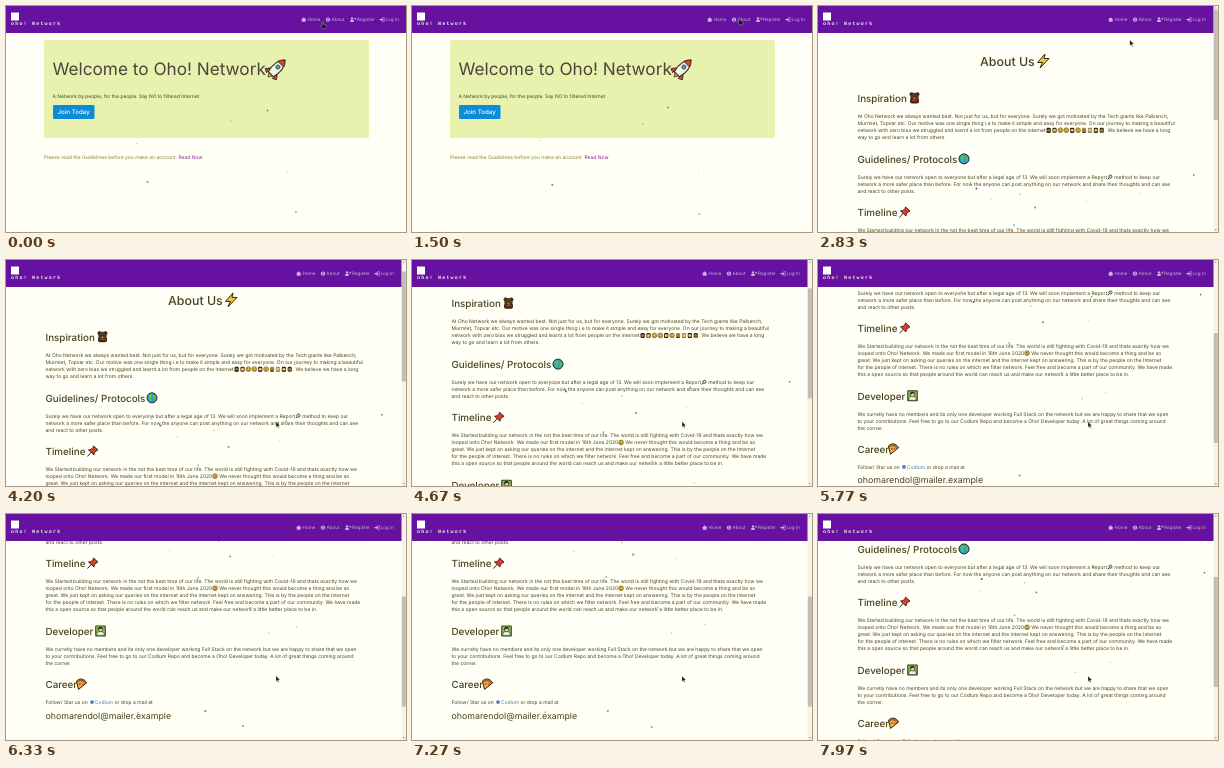
These frames come from a looping animation (400 px wide and 226 px high, 8 s). An HTML page with a canvas:

```html
<!DOCTYPE html>
<html lang="en">
<head>
<meta charset="utf-8">
<title>Oho! Network</title>
<style>
  html, body { margin: 0; width: 100%; height: 100%; overflow: hidden; background: #fffff6; }
  canvas { display: block; width: 100vw; height: 100vh; }
</style>
</head>
<body>
<canvas></canvas>
<script>
const LOOP = 8000, PAGE_SWITCH = 2080;
const INK = '#47441f', PURPLE = '#66119f', PAPER = '#fffff6', OUTLINE = '#2b251c';
const canvas = document.querySelector('canvas');
const ctx = canvas.getContext('2d');

// Key lists: [time, value, value, ...]
const SCROLL = [[3980, 0], [4200, 15], [5100, 79.5], [5770, 138], [5920, 157], [7530, 157], [7970, 118], [8000, 116]];
const POINTER = [[0, 316, 16], [700, 318, 12.5], [1200, 327, 12], [2480, 326, 12],
  [2780, 312, 33.5], [2950, 311.5, 35], [3700, 270, 161.5], [8000, 270, 162]];

// Drifting specks, placed in page coordinates
const HOME_SPECKS = [[225, 115], [256, 104], [146, 177], [283, 165], [284, 208], [134, 135]];
const ABOUT_SPECKS = [[149, 172], [381, 173], [219, 198], [167, 196], [197, 217], [268, 199], [278, 172],
  [160, 184], [240, 247], [260, 280], [287, 268], [207, 188], [200, 350], [138, 359], [236, 367], [316, 186]];

function at(keys, t) {
  let i = keys.findIndex(k => k[0] > t);
  if (i < 0) return keys.at(-1).slice(1);
  if (i === 0) return keys[0].slice(1);
  const [a, b] = [keys[i - 1], keys[i]];
  const p = (t - a[0]) / (b[0] - a[0]);
  return a.slice(1).map((v, n) => v + (b[n + 1] - v) * p);
}

// ---- drawing helpers ----
function rect(x, y, w, h, color, radius = 0) {
  ctx.fillStyle = color;
  ctx.beginPath();
  ctx.roundRect(x, y, w, h, radius);
  ctx.fill();
}

function dot(x, y, r, color, line) {
  ctx.beginPath();
  ctx.arc(x, y, r, 0, 7);
  ctx.fillStyle = color;
  ctx.fill();
  if (line) { ctx.lineWidth = line; ctx.strokeStyle = OUTLINE; ctx.stroke(); }
}

function shape(d, color, line, stroke = OUTLINE) {
  const path = new Path2D(d);
  if (color) { ctx.fillStyle = color; ctx.fill(path); }
  if (line) { ctx.lineWidth = line; ctx.strokeStyle = stroke; ctx.stroke(path); }
}

function placed(x, y, draw, angle = 0) {
  ctx.save();
  ctx.translate(x, y);
  ctx.rotate(angle);
  draw();
  ctx.restore();
}

function setFont(size, weight = 400, family = 'Inter, "Open Sans", sans-serif') {
  ctx.font = `${weight} ${size}px ${family}`;
}

// ---- icons, each centred on the origin ----
const icons = {
  rocket() {
    shape('M-4 3L-8 8L-4 10ZM4 3L8 8L4 10Z', '#d8432f', .8);
    shape('M-2.5 8L0 12L2.5 8Z', '#f3b32c', .7);
    shape('M0 -12C6 -6 5 3 3.5 8H-3.5C-5 3 -6 -6 0 -12Z', '#f4f4ea', 1);
    shape('M0 -12C2.5 -9.5 3.6 -7.8 4 -6H-4C-3.6 -7.8 -2.5 -9.5 0 -12Z', '#d8432f', .8);
    dot(0, -2, 2, '#3fb5c8', .8);
  },
  bolt() { shape('M2 -7L-5.5 1.5H-.5L-3 7L6 -2.5H1Z', '#f6c62d', 1); },
  bear() {
    dot(-3, -3.7, 1.6, '#4d3018', .8);
    dot(3, -3.7, 1.6, '#4d3018', .8);
    rect(-4.5, 0, 9, 5.5, '#3a2414', 2);
    dot(0, -1, 3.8, '#5f3c1e', .7);
    rect(-3, 2, 6, 1.3, '#b53a2a');
    dot(-1.4, -1.6, .5, '#17130f');
    dot(1.4, -1.6, .5, '#17130f');
    dot(0, .4, 1, '#a87f50');
  },
  globe() {
    dot(0, 0, 5, '#259fe0', 1);
    shape('M-4 -2L-1 -4L1 -2L-1 0L0 3L-2 3L-3 0ZM2 -3L4 -1L3.5 2L1.5 1Z', '#5cc440');
  },
  pin() {
    shape('M-1 1L-5 5.5', null, 1);
    shape('M1 -5L5.5 -1L4 0L2 1.5L1.5 4L-4 -1L-1.5 -1.5L.5 -3.5Z', '#e03a26', .9);
  },
  developer() {
    rect(-5.3, -5.5, 10.6, 11, '#2e3a22', 1);
    rect(-4.3, -4.5, 8.6, 9, '#7dbb55');
    shape('M-3.5 4.5V2L-1.5 .7H1.5L3.5 2V4.5Z', '#f7f4e2', .5);
    dot(0, -1.3, 2.2, '#f2d68a', .6);
    shape('M-2.3 -1.2C-2.3 -5 2.3 -5 2.3 -1.2L1 -2.5Z', '#2e2517');
  },
  slice() {
    shape('M-5 -2.5C-3 -6 3 -5.5 5 -1L-3 5.5Z', '#f0b23d', 1);
    shape('M-5 -2.5C-3 -6 3 -5.5 5 -1L4 .2C1.5 -3 -1.5 -4 -4.7 -1.5Z', '#b8692b', .4);
    dot(-1.7, 0, 1, '#d5472d');
    dot(1, .2, .9, '#d5472d');
  },
  face() {
    dot(0, 0, 2.4, '#efc437', .5);
    dot(-.8, -.6, .4, OUTLINE);
    dot(.8, -.6, .4, OUTLINE);
    shape('M-1.2 .6Q0 2 1.2 .6', null, .5);
  },
  person(n) {
    const hair = ['#211a14', '#3a2a1b', '#b88632', '#8c8a80'][n % 4];
    rect(-2.1, -2.4, 4.2, 4.9, hair, 1.3);
    dot(0, .1, 1.5, n % 3 ? '#efc85a' : '#a9713c');
    rect(-1.7, 1.6, 3.4, 1, n % 2 ? '#5a8c4a' : '#2f2a22');
  },
  glass() {
    shape('M-.6 .6L-2.2 2.2', null, 1);
    dot(.5, -.5, 1.6, '#b9dcea', .7);
  },
  disc() { dot(0, 0, 1.9, '#477fc0'); }
};
const INLINE = { f: 'face', g: 'glass', c: 'disc' };

// Inline marks: {f} {g} {c} small icons, {p} a row of people, {b} blue ink, {i} normal ink
function text(content, x, y, size, color = INK, weight = 400) {
  content.split(/\{(\w)\}/).forEach((part, i) => {
    if (i % 2 === 0) {
      setFont(size, weight);
      ctx.fillStyle = color;
      ctx.fillText(part, x, y);
      x += ctx.measureText(part).width;
    } else if (part === 'p') {
      for (let n = 0; n < 10; n++, x += 5.9)
        placed(x + 3, y - 1.7, () => n > 1 && n < 6 && n !== 4 ? icons.face() : icons.person(n));
    } else if (INLINE[part]) {
      placed(x + 2.8, y - 1.7, icons[INLINE[part]]);
      x += 5.6;
    } else {
      color = part === 'b' ? '#477fc0' : INK;
    }
  });
  return x;
}

// ---- pages ----
const SECTIONS = [
  { title: 'Inspiration', y: 95.7, icon: 'bear', iconX: 96.5, lines: [
    'At Oho Network we always wanted best. Not just for us, but for everyone. Surely we got motivated by the Tech giants like Palbench,',
    'Murmlet, Topvar etc. Our motive was one single thing i.e to make it simple and easy for everyone. On our journey to making a beautiful',
    'network with zero bias we struggled and learnt a lot from people on the internet{p}. We believe we have a long',
    'way to go and learn a lot from others.'] },
  { title: 'Guidelines/ Protocols', y: 156.7, icon: 'globe', iconX: 146, lines: [
    'Surely we have our network open to everyone but after a legal age of 13. We will soon implement a Report{g} method to keep our',
    'network a more safer place than before. For now the anyone can post anything on our network and share their thoughts and can see',
    'and react to other posts.'] },
  { title: 'Timeline', y: 209.8, icon: 'pin', iconX: 86.5, lines: [
    'We Started building our network in the not the best time of our life. The world is still fighting with Covid-19 and thats exactly how we',
    'looped onto Oho! Network. We made our first model in 16th June 2020{f} We never thought this would become a thing and be so',
    'great. We just kept on asking our queries on the internet and the internet kept on answering. This is by the people on the Internet',
    'for the people of interest. There is no rules on which we filter network. Feel free and become a part of our community. We have made',
    'this a open source so that people around the world can reach us and make our network a little better place to be in.'] },
  { title: 'Developer', y: 277.7, icon: 'developer', iconX: 94.5, lines: [
    'We curretly have no members and its only one developer working Full Stack on the network but we are happy to share that we open',
    'to your contributions. Feel free to go to our Codlum Repo and become a Oho! Developer today. A lot of great things coming around',
    'the corner.'] },
  { title: 'Career', y: 330.7, icon: 'slice', iconX: 75.5, lines: [
    'Follow/ Star us on {c}{b}Codlum{i} or drop a mail at'] }
];

function homePage() {
  rect(38, 34, 325, 98, '#e9f1ae', 1.2);
  text('Welcome to Oho! Network', 46.5, 68.5, 17.2, '#48463a');
  placed(270.5, 62.5, icons.rocket, Math.PI / 4);
  text('A Network by people, for the people. Say NO to filtered Internet', 46.5, 92.2, 4.9, '#44422f');
  rect(47, 99, 41.5, 14, '#0c8bd9', 1.3);
  text('Join Today', 51.5, 108.2, 6.2, '#fff', 500);
  const end = text('Please read the Guidelines before you make an account. ', 38, 152.8, 5, '#85823f');
  text('Read Now', end, 152.8, 5, '#8a2a92');
}

function aboutPage() {
  text('About Us', 162, 59.8, 12.4, INK, 500);
  placed(225, 55, icons.bolt);
  for (const { title, y, icon, iconX, lines } of SECTIONS) {
    text(title, 39.5, y, 9.8, INK, 500);
    placed(iconX, y - 3.8, icons[icon]);
    lines.forEach((line, i) => text(line, 39.5, y + 16.1 + i * 7.05, 5));
  }
  text('ohomarendol@mailer.example', 39.5, 361.5, 8.8);
}

function specks(points, t) {
  const colors = ['#35bd6b', '#7652ad', '#36a3d4', '#a9d8d0', '#55c9b5', '#d6cf45'];
  points.forEach(([x, y], i) => {
    const swing = t / (1100 + i % 5 * 170);
    const size = 1.1 + i * 7 % 5 * .2;
    placed(x + 6 * Math.sin(swing + i * 2), y + 4 * Math.sin(swing * .7 + i * 3),
      () => rect(-size / 2, -size / 2, size, size, colors[i % colors.length], size / 3));
  });
}

function header(shift) {
  const link = '#cdb0de';
  rect(0, 0, 400, 27, PURPLE);
  rect(5, 6.5, 8, 8, '#fff');
  setFont(5, 700, '"Liberation Mono", monospace');
  ctx.letterSpacing = '1.2px';
  ctx.fillStyle = '#f3eaf8';
  ctx.fillText('oho! Network', 5, 19);
  ctx.letterSpacing = '0px';

  ctx.save();
  ctx.translate(shift, 0);
  text('Home', 301.5, 15.3, 4.6, link);
  text('About', 325.5, 15.3, 4.6, link);
  text('Register', 351, 15.3, 4.6, link);
  text('Log In', 379.5, 15.3, 4.6, link);
  shape('M295 13.7L297.7 11.3L300.4 13.7H299.6V15.8H295.8V13.7Z', link);
  dot(322, 13.6, 2.2, link);
  rect(321.6, 12.3, .8, 2.6, PURPLE);
  dot(346, 12.5, 1.2, link);
  rect(344, 14, 4, 1.9, link, .8);
  shape('M348 12.8H350.4M349.2 11.6V14', null, .6, link);
  shape('M373.5 13H375.5V11.7L377.6 13.7L375.5 15.6V14.3H373.5Z', link);
  shape('M376.4 11.6H378.2V15.7H376.4', null, .6, link);
  ctx.restore();
}

function scrollbar(scroll) {
  rect(395.5, 0, 4.5, 226, '#f3f3e6');
  rect(395.8, 4 + scroll / 2, 4, 110, '#bebeb6');
  shape('M396.7 2.6L397.8 1.2L398.9 2.6Z', '#77766a');
  shape('M396.7 223.2L397.8 224.6L398.9 223.2Z', '#77766a');
}

function pointer(x, y, hand) {
  placed(x, y, () => {
    if (hand) shape('M0 0Q.7 -.6 1.2 .2V2.2L4 2.8Q4.6 4 3.6 6.8H.8L-1.2 4.2Q-1 3.2 0 4Z', '#171318', .4, '#c9b8d3');
    else shape('M0 0V5.6L1.3 4.5L2.1 6.4L3.1 6L2.3 4.1H4Z', '#15130f', .4, '#e8e5d6');
  });
}

function frame(now) {
  const t = now % LOOP;
  const about = t >= PAGE_SWITCH;
  const [scroll] = at(SCROLL, t);
  const [x, y] = at(POINTER, t);
  const ratio = window.devicePixelRatio || 1;
  const width = Math.round(innerWidth * ratio), height = Math.round(innerHeight * ratio);
  if (canvas.width !== width || canvas.height !== height) Object.assign(canvas, { width, height });
  ctx.setTransform(width / 400, 0, 0, height / 226, 0, 0);
  ctx.textRendering = 'geometricPrecision';

  rect(0, 0, 400, 226, PAPER);
  placed(0, about ? -scroll : 0, () => {
    if (about) aboutPage(); else homePage();
    specks(about ? ABOUT_SPECKS : HOME_SPECKS, t);
  });
  header(about ? -5 : 0);
  if (about) scrollbar(scroll);
  pointer(x, y, y < 26);
  requestAnimationFrame(frame);
}
requestAnimationFrame(frame);
</script>
</body>
</html>
```
